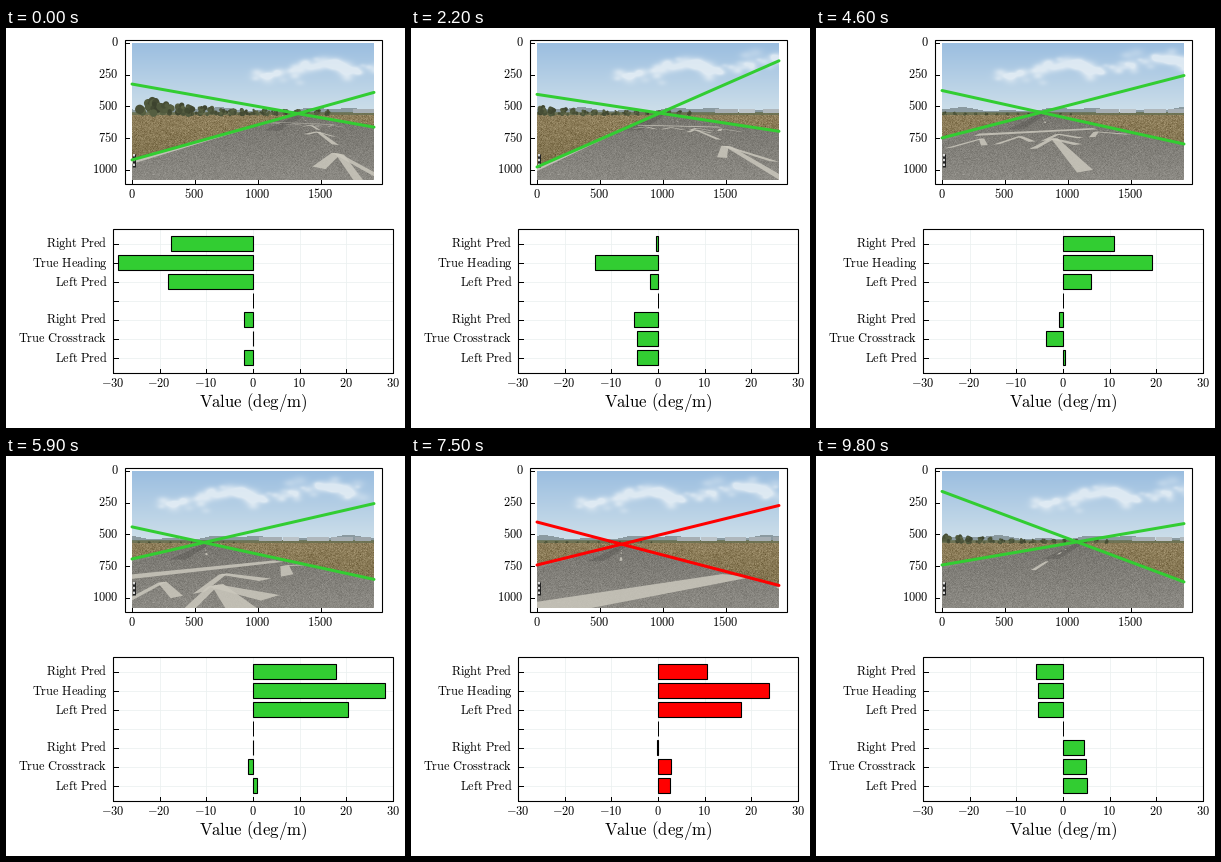
These frames come from a looping animation (399 px wide and 400 px high, 9.9 s). A matplotlib script:

```python
import numpy as np
import matplotlib.pyplot as plt
from matplotlib.animation import FuncAnimation
from matplotlib.collections import PolyCollection
from matplotlib.patches import Polygon, Rectangle

W, H, DPI = 399, 400, 100
FRAMES, INTERVAL = 99, 100
PT = 72 / DPI                                  # points per pixel
GREEN, RED = "limegreen", "red"
LEFT, RIGHT, TOP, BOTTOM = 126, 368, 15, 152   # photo area
ZERO, UNIT = 247, 280 / 60                     # bar chart scale
ROW, STEP = 216, 19                            # first bar and bar spacing

rng = np.random.default_rng(4)
plt.rcParams["mathtext.fontset"] = "cm"

# The true state swings like a pendulum over the run.
frames = np.arange(FRAMES)
swing = np.cos(np.pi * (frames - 0.5) / 62.5)
heading = -28.9 * swing
crosstrack = -5 * np.sin(np.pi * frames / 63)

# Estimates are smooth curves through a few key poses.
KEYS = np.array([0, 11, 33, 46, 59, 75, 98])


def track(*values):
    """Cubic Hermite curve through the values at KEYS, one value per frame."""
    v = np.array(values, float)
    slope = np.gradient(v, KEYS)
    i = np.clip(np.searchsorted(KEYS, frames, side="right") - 1, 0, len(KEYS) - 2)
    h = KEYS[i + 1] - KEYS[i]
    t = (frames - KEYS[i]) / h
    return ((2 * t**3 - 3 * t**2 + 1) * v[i] + (t**3 - 2 * t**2 + t) * h * slope[i]
            + (3 * t**2 - 2 * t**3) * v[i + 1] + (t**3 - t**2) * h * slope[i + 1])


right_heading = track(-17.6, -8.9, 6.6, 10.9, 17.8, 10.5, -5.7)
left_heading = track(-18.2, -10.5, 4.9, 6.1, 20.3, 17.8, -5.3)
right_cross = track(-1.9, -4.2, -4.4, -0.8, 0.05, -0.2, 4.5)
left_cross = track(-1.9, -4.0, -3.2, 0.4, 0.8, 2.6, 5.1)

# The runway edges meet at the vanishing point.
vanish_x = track(292, 270.5, 232, 225, 198, 210.6, 261)
vanish_y = track(85.6, 85, 85.2, 84.4, 86.5, 88.2, 85.9)
right_slope = track(0.178, 0.159, 0.167, 0.221, 0.217, 0.262, 0.374)
left_slope = track(0.279, 0.395, 0.405, 0.258, 0.229, 0.246, 0.171)

rows = [("Right Pred", right_heading), ("True Heading", heading),
        ("Left Pred", left_heading), ("", None), ("Right Pred", right_cross),
        ("True Crosstrack", crosstrack), ("Left Pred", left_cross)]
# The two predictions disagree too much: warn in red.
alarm = np.abs(left_cross - right_cross) > 1.7

tree_scale = 0.62 + 0.38 * swing
edge_alpha = 0.8 * np.clip((48 - frames) / 20, 0.1, 1)

# Runway paint in ground coordinates: u across (0 to 1), z inverse of screen depth.
BAR_Z, SPEED, NEAR = 0.107, 0.00113, 0.006


def strip(u1, z1, u2, z2, half=0.014):
    return np.array([(u1 - half, z1), (u1 + half, z1), (u2 + half, z2), (u2 - half, z2)])


def chevron(u, z):
    return [strip(u, z, u + side * 0.075, z - 0.009) for side in (-1, 1)]


paint_shapes = [np.array([(0.06, BAR_Z), (0.8, BAR_Z),
                          (0.8, BAR_Z - 0.005), (0.06, BAR_Z - 0.005)])]
for u in (0.15, 0.35, 0.55, 0.75):
    paint_shapes += chevron(u, BAR_Z - 0.011)
for i in range(3):
    z = BAR_Z - 0.018 - 0.03 * i
    paint_shapes += chevron(0.51, z) + [strip(0.52, z, 0.54, z - 0.022)]
    dash = BAR_Z + 0.054 + 0.045 * i
    paint_shapes.append(strip(0.51, dash, 0.51, dash - 0.016, 0.01))


def project(shape, n):
    u = shape[:, 0]
    depth = 1 / np.maximum(shape[:, 1] - SPEED * n, NEAR)
    dx = depth * (u / right_slope[n] - (1 - u) / left_slope[n])
    dy = depth * (1 - 0.00014 * heading[n] * dx)
    return np.c_[vanish_x[n] + dx, vanish_y[n] + dy]


def rgb(code):
    return np.array([int(code[i:i + 2], 16) for i in (1, 3, 5)]) / 255


def fade(top, bottom, height, width, grain=0.0):
    t = np.linspace(0, 1, height)[:, None, None]
    img = rgb(top) * (1 - t) + rgb(bottom) * t + np.zeros((1, width, 1))
    img += rng.normal(0, 1, (height, width, 1)) * grain
    return np.clip(img, 0, 1)


def make_sky():
    """Panorama around the vanishing point: a rising bank of clouds and far hills."""
    img = fade("#9bbee0", "#cfe0ea", 72, 380)
    y, x = np.mgrid[TOP:TOP + 72, -180:200]
    cloud = np.zeros(x.shape)
    for t in rng.uniform(0, 1, 110):
        cx = -45 + 200 * t + rng.normal(0, 4)
        cy = 46 - 14 * t + 5 * np.sin(14 * t) + rng.normal(0, 4)
        s = rng.uniform(2, 5.5)
        cloud += 0.28 * np.exp(-((x - cx)**2 + 2.5 * (y - cy)**2) / (2 * s * s))
    cloud = np.clip(cloud, 0, 0.75)[..., None]
    img = img * (1 - cloud) + rgb("#eef4f8") * cloud
    hills = y > 81 - 1.5 * np.sin(x / 19) - np.sin(x / 7)
    img[hills] = rgb("#8b9aa0")
    return img


fig = plt.figure(figsize=(W / DPI, H / DPI), dpi=DPI, facecolor="white")
ax = fig.add_axes([0, 0, 1, 1])
ax.axis("off")


def set_view():
    ax.set_xlim(0, W)
    ax.set_ylim(H, 0)


def line(xs, ys, width=1.0, color="black", z=5, **kw):
    return ax.plot(xs, ys, color=color, lw=width * PT, zorder=z, **kw)[0]


def frame_box(x0, y0, x1, y1):
    ax.add_patch(Rectangle((x0, y0), x1 - x0, y1 - y0, fill=False,
                           ec="black", lw=1.1 * PT, zorder=6))


def label(x, y, text, ha="center", size=12.4):
    body = text.replace(" ", r"\ ")
    ax.text(x - 0.5, y - 0.5, rf"$\mathrm{{{body}}}$", ha=ha, va="baseline",
            fontsize=size * PT, zorder=6)


def picture(img, z, extent):
    return ax.imshow(img, extent=extent, aspect="auto", zorder=z,
                     interpolation="bilinear")


def shape(z, color, alpha=1):
    return ax.add_patch(Polygon([(0, 0), (1, 0), (1, 1)], fc=color, ec="none",
                                alpha=alpha, zorder=z))


# Photo
photo = ax.add_patch(Rectangle((LEFT, TOP), RIGHT - LEFT, BOTTOM - TOP,
                               fc="none", ec="none"))
ground = (LEFT, RIGHT, BOTTOM, 85)
sky = picture(make_sky(), 1, (0, 380, 87, TOP))
grass = picture(fade("#90805c", "#786b48", 67, 242, 0.04), 1.2, ground)
asphalt = picture(fade("#77756f", "#8b8983", 67, 242, 0.025), 1.6, ground)
road = shape(1, "none")
skid = shape(1.7, "#3c3b38", 0.25)
edge = shape(1.8, "#d2d0c6")
treeline = ax.add_patch(Rectangle((LEFT, 83.5), RIGHT - LEFT, 3,
                                  fc="#667052", alpha=0.8, zorder=1.3))
sheds = []
for offset in range(55, 200, 24):
    tone = rng.uniform(0.58, 0.82)
    sheds.append((offset, ax.add_patch(
        Rectangle((0, 80.5), rng.uniform(14, 24), 4,
                  fc=(tone, tone + 0.03, tone + 0.05), zorder=1.4))))

# Each tree is a clump of round puffs; the row gets smaller into the distance.
puffs = []
for i, offset in enumerate(np.linspace(-150, 30, 18)):
    r = 2.5 + 6 * np.exp(-i / 5)
    for _ in range(14):
        puffs.append((offset, rng.normal(0, 0.5) * r,
                      -r * rng.uniform(0.1, 1.7), r * rng.uniform(0.3, 0.55)))
puffs = np.array(puffs)
tones = [rgb("#4b5339") * k for k in rng.uniform(0.8, 1.2, len(puffs))]
trees = ax.scatter(puffs[:, 0], puffs[:, 2], c=tones, linewidths=0, zorder=1.5)

paint = PolyCollection([], zorder=1.9, linewidths=0, facecolors="#cbc8bd", alpha=0.85)
ax.add_collection(paint, autolim=False)

for artist in [sky, grass, skid, edge, treeline, trees] + [s for _, s in sheds]:
    artist.set_clip_path(photo)

# Tiny read-out in the corner of the photo
line([128, 128], [126, 139], 3, "#222222", 2, solid_capstyle="butt")
line([128, 128], [126, 139], 1.6, "white", 2.1, dashes=(1.5, 1.5), dash_capstyle="butt")

sights = [line([LEFT, RIGHT], [0, 0], 3, GREEN, 4, solid_capstyle="round")
          for _ in range(2)]

# Photo axes
frame_box(119, 12, 376, 156)
for v in range(0, 1501, 500):
    x = LEFT + v * 0.126
    line([x, x], [152, 156])
    label(x, 171, str(v))
for v in range(0, 1001, 250):
    y = TOP + v * 0.1268
    line([119, 123], [y, y])
    label(113, y + 4, str(v), "right")

# Bar chart
frame_box(107, 201, 387, 345)
for v in range(-30, 31, 10):
    x = ZERO + v * UNIT
    line([x, x], [201, 345], 0.8, "#ebf1f0", 1)
    line([x, x], [341, 345])
    label(x, 359.5, str(v))
label(247.5, 379, "Value (deg/m)", size=16.8)

bars = []
for i, (name, values) in enumerate(rows):
    y = ROW + STEP * i
    line([107, 387], [y, y], 0.8, "#ebf1f0", 1)
    line([107, 111.5], [y, y])
    if values is None:
        line([ZERO, ZERO], [y - 8, y + 7], solid_capstyle="butt")
        continue
    label(102, y + 4, name, "right")
    bar = Rectangle((ZERO, y - 8), 0, 15, ec="black", lw=1.1 * PT, zorder=4)
    bars.append((ax.add_patch(bar), values))

set_view()


def edge_y(n, x):
    """Heights of the right and left edge lines at x."""
    dx = x - vanish_x[n]
    return vanish_y[n] + right_slope[n] * dx, vanish_y[n] - left_slope[n] * dx


def draw_scene(n):
    vx, vy = vanish_x[n], vanish_y[n]
    left, right = edge_y(n, LEFT)[1], edge_y(n, RIGHT)[0]
    sky.set_extent((vx - 180, vx + 200, 87, TOP))
    set_view()
    for offset, shed in sheds:
        shed.set_x(vx + offset)

    k = tree_scale[n]
    trees.set_offsets(np.c_[vx + puffs[:, 0] + k * puffs[:, 1], 87 + k * puffs[:, 2]])
    trees.set_sizes((2 * puffs[:, 3] * k * PT) ** 2)

    road.set_xy([(vx - 4, vy + 1), (vx + 4, vy + 1), (RIGHT, right),
                 (RIGHT, BOTTOM), (LEFT, BOTTOM), (LEFT, left)])
    edge.set_xy([(vx - 4, vy + 1), (LEFT, left), (LEFT, left + 4)])
    edge.set_alpha(edge_alpha[n])
    skid.set_xy([(vx, vy + 1), (vx + 4, vy + 3), (vx - 18, vy + 17), (vx - 34, vy + 17)])
    asphalt.set_clip_path(road)

    ahead = [s for s in paint_shapes if s[:, 1].max() - SPEED * n > NEAR]
    paint.set_verts([project(s, n) for s in ahead])
    paint.set_clip_path(road)


def update(n):
    draw_scene(n)
    color = RED if alarm[n] else GREEN
    for sight, ends in zip(sights, zip(edge_y(n, LEFT), edge_y(n, RIGHT))):
        sight.set_ydata(ends)
        sight.set_color(color)
    for bar, values in bars:
        bar.set_width(values[n] * UNIT)
        bar.set_facecolor(color)
    return []


anim = FuncAnimation(fig, update, frames=FRAMES, interval=INTERVAL,
                     repeat=True, repeat_delay=0, blit=False)
plt.show()
```
